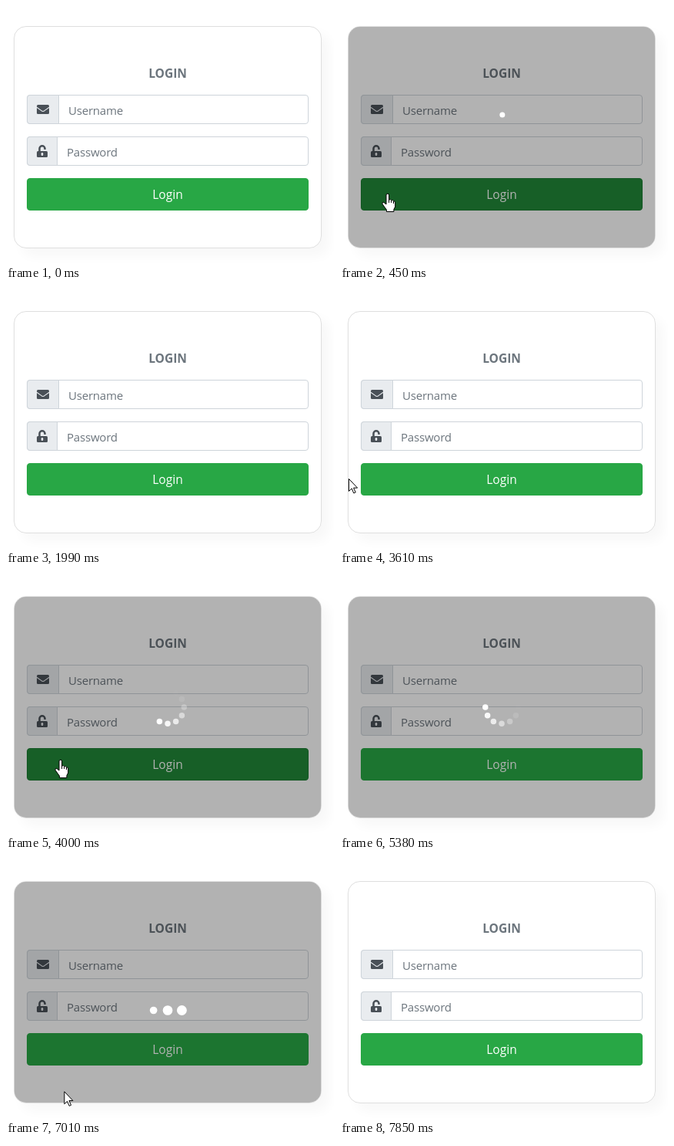
Write an HTML page that moves like this. It is 426 px wide and 333 px high and loops after 8160 ms.

```html
<!DOCTYPE html>
<html lang="en">
<head>
<meta charset="utf-8">
<title>Login</title>
<style>
  html, body { margin: 0; height: 100%; overflow: hidden; background: #fff; }
  .card { position: absolute; left: 10px; top: 26px; width: 398px; height: 286px;
    border: 1px solid #dfdfdf; border-radius: 16px; box-shadow: 10px 10px 15px rgba(0, 0, 0, .03); }
  svg { position: relative; display: block; width: 426px; height: 333px;
    font: 15px "Open Sans", "Noto Sans", sans-serif; }
  .field { fill: #fff; stroke: #ced4da; }
  .addon { fill: #e9ecef; stroke: #ced4da; }
  .hint { fill: #6c757d; letter-spacing: -.2px; }
  .label { font-size: 15.5px; text-anchor: middle; }
  .icon { fill: #495057; }
  .cut { fill: none; stroke: #e9ecef; stroke-linecap: round; }
  .pointer { fill: #fff; stroke: #000; stroke-linejoin: round; }
</style>
</head>
<body>
<div class="card"></div>
<svg viewBox="0 0 426 333">
  <text class="label" x="210" y="93" font-weight="700" fill="#6c757d">LOGIN</text>

  <rect class="field" x="27.5" y="115.5" width="365" height="37" rx="3.5"/>
  <path class="addon" d="M68.5 115.5H31a3.5 3.5 0 0 0-3.5 3.5v30a3.5 3.5 0 0 0 3.5 3.5h37.5z"/>
  <rect class="icon" x="40" y="128" width="16" height="12" rx="1.5"/>
  <path class="cut" stroke-width="1.1" d="M39.5 131l6.2 4.4q2.3 2.2 4.6 0l6.2-4.4"/>
  <text class="hint" x="81" y="141">Username</text>

  <rect class="field" x="27.5" y="169.5" width="365" height="37" rx="3.5"/>
  <path class="addon" d="M66.5 169.5H31a3.5 3.5 0 0 0-3.5 3.5v30a3.5 3.5 0 0 0 3.5 3.5h35.5z"/>
  <rect class="icon" x="40" y="188" width="14" height="8" rx="1.5"/>
  <path fill="none" stroke="#495057" stroke-width="2.5" d="M43.5 189v-4.2a3.5 3.5 0 0 1 7 0v1.2"/>
  <path class="cut" stroke-width="2.5" d="M47 191.3v1.4"/>
  <text class="hint" x="79" y="195">Password</text>

  <rect id="button" x="27.5" y="223.5" width="365" height="41" rx="3.5"/>
  <text class="label" x="210" y="250" fill="#fff">Login</text>

  <g id="overlay">
    <rect x="11" y="27" width="398" height="286" rx="15" fill-opacity=".3"/>
    <g id="dots" fill="#fff"></g>
  </g>

  <path id="arrow" class="pointer" d="M.5.5v16l3.7-3.5 2.6 6 2.4-1-2.6-5.800h5z"/>
  <g id="hand" class="pointer">
    <path d="M-2 2a1.800 1.800 0 0 1 3.600 0v6q2.200-1 3 .8 2-.7 2.900 1 2.200-.3 2.200 2V17l-1.800 3.500v3h-9.500V21l-5.200-7.200q-1.200-2.600 1.600-2.400L-2 14z"/>
    <path d="M1.600 8v4m3-3v3m2.900-2v3"/>
  </g>
</svg>
<script>
const LOOP = 8160, TICK = 77, FIRST = 62, CX = 210, CY = 170;
const $ = id => document.getElementById(id);
const clamp = v => Math.min(1, Math.max(0, v));
const mix = (a, b, k) => a + (b - a) * k;
const frac = v => v - Math.floor(v);
const dotList = (count, make) => Array.from({ length: count }, (_, i) => make(i));

function bezier(x1, y1, x2, y2) {
  const at = (a, b, s) => 3 * a * s * (1 - s) ** 2 + 3 * b * s * s * (1 - s) + s ** 3;
  return x => {
    let lo = 0, hi = 1;
    for (let i = 0; i < 24; i++) {
      const mid = (lo + hi) / 2;
      if (at(x1, x2, mid) < clamp(x)) lo = mid; else hi = mid;
    }
    return at(y1, y2, lo);
  };
}
const ease = bezier(.25, .1, .25, 1);
const easeInOut = bezier(.42, 0, .58, 1);

function polar(deg, radius, r, alpha = 1) {
  const a = deg * Math.PI / 180;
  return [CX + radius * Math.sin(a), CY - radius * Math.cos(a), r, alpha];
}

// Spinners return dots as [x, y, radius, opacity]
function comet(age) {
  const p = frac(age / 1700), em = 35;
  const fan = ease((p - .05) / .3) * (1 - ease((p - .38) / .45));
  return dotList(5, i =>
    polar(ease(p) * 360 - fan * 28 * i * (1 - .06 * i), .83 * em, (.1 - .02 * i) * em));
}

function fadingRing(age) {
  return dotList(12, i => {
    const q = frac(age / 1200 - i / 12);
    return polar(i * 30, 21.25, 3.75, q < .4 ? 0 : 1 - easeInOut((q - .4) / .6));
  });
}

function bounce(age) {
  const em = 5.25;
  return dotList(3, i => {
    const q = frac((age + 320 - 160 * i) / 1800);
    const swell = easeInOut(1 - Math.abs(q - .4) / .4);
    return [CX + (i - 1) * 3.5 * em, 193.5, em * Math.max(0, 1.3 * swell - .05), 1];
  });
}

// Pointer moves from enter to rest, waits, then moves to exit: [time, x, y]
const rounds = [
  { enter: [60, 72, 306], hover: 262, rest: [370, 62, 243], start: 430,
    leave: 877, exit: [1230, 15, 272], end: 1985, spin: comet },
  { enter: [3600, 10, 243], hover: 3669, rest: [3835, 71, 238], start: 3950,
    leave: 3989, exit: [4210, 14, 249], end: 5450, spin: fadingRing },
  { enter: [5910, 86, 326], hover: 6112, rest: [6222, 120, 231], start: 6340,
    leave: 6776, exit: [7100, 53, 332], end: 7835, spin: bounce }
];

function pointerAt({ enter, rest, leave, exit }, t) {
  const arrive = clamp((t - enter[0]) / (rest[0] - enter[0]));
  const depart = clamp((t - leave) / (exit[0] - leave));
  return [1, 2].map(n => mix(mix(enter[n], rest[n], arrive), exit[n], depart));
}

const dots = dotList(12, () =>
  $("dots").appendChild(document.createElementNS("http://www.w3.org/2000/svg", "circle")));
const show = (el, on) => el.setAttribute("visibility", on ? "visible" : "hidden");
const blend = (from, to, k) => `rgb(${from.map((v, i) => Math.round(mix(v, to[i], k)))})`;

function draw(t) {
  const round = rounds.findLast(r => t >= r.enter[0]) || rounds[0];
  const { enter, hover, start, exit, end, spin } = round;
  const busy = t >= start && t < end;
  const release = start + 50;

  const shade = clamp((t - hover) / 150) - clamp((t - release) / 150);
  const green = [40, 167, 69];
  $("button").setAttribute("fill", blend(green, [33, 136, 56], shade));
  $("button").setAttribute("stroke", blend(green, [30, 126, 52], shade));

  show($("overlay"), busy);
  const live = busy ? spin(t - start) : [];
  dots.forEach((dot, i) => {
    const values = live[i] || [0, 0, 0, 0];
    ["cx", "cy", "r", "opacity"].forEach((name, n) => dot.setAttribute(name, values[n]));
  });

  const present = t >= enter[0] && t < exit[0];
  const pointing = t >= hover && t < release;
  const [x, y] = pointerAt(round, t);
  for (const id of ["arrow", "hand"]) {
    show($(id), present && pointing === (id === "hand"));
    $(id).setAttribute("transform", `translate(${x} ${y})`);
  }
}

const origin = performance.now();
function frame() {
  const t = (performance.now() - origin) % LOOP;
  draw(FIRST + Math.floor((t - FIRST) / TICK) * TICK);
  requestAnimationFrame(frame);
}
frame();
</script>
</body>
</html>
```
